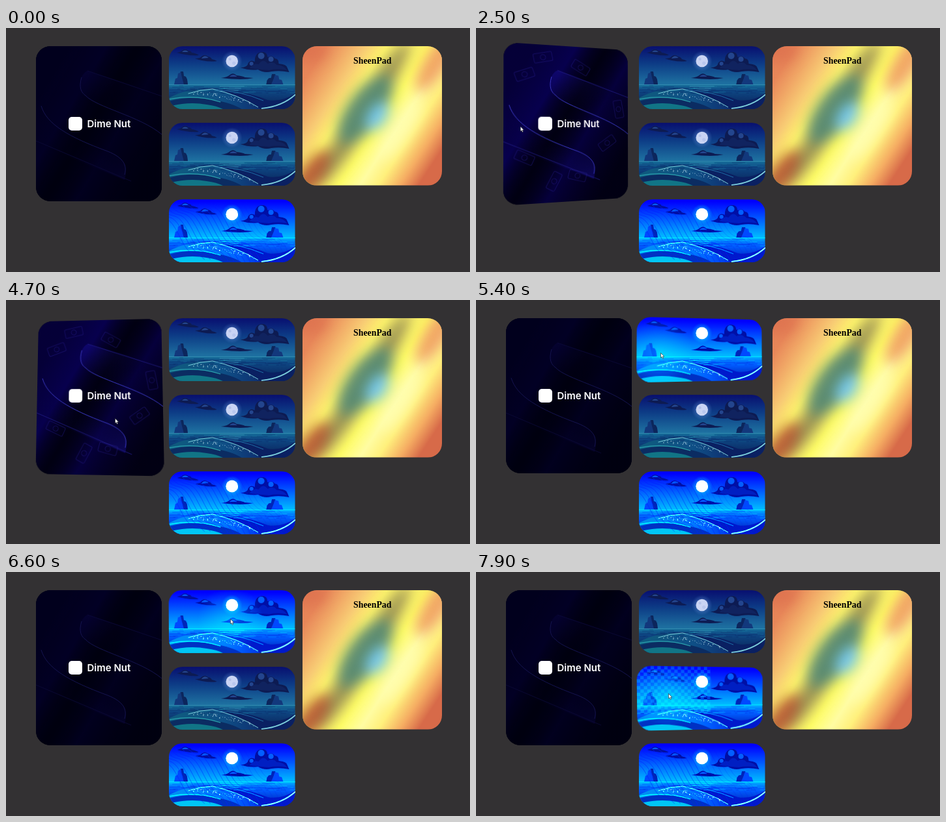
An HTML page for the animation above (8000 ms loop, 712 by 376 pixels).

```html
<!DOCTYPE html>
<html lang="en">
<head>
<meta charset="utf-8">
<title>Tilting cards</title>
<style>
html, body { margin: 0; width: 100%; height: 100%; overflow: hidden; background: #333133; }
#stage { position: relative; width: 712px; height: 376px; overflow: hidden; }
.card { position: absolute; overflow: hidden; border-radius: 21px; }
.card svg { position: absolute; inset: 0; width: 100%; height: 100%; }
.wide { left: 250px; width: 193.5px; height: 97px; }
.glow { position: absolute; inset: 0; opacity: 0; }
#pay { left: 46px; top: 28px; width: 193px; height: 239px; border-radius: 22px; background: #00000f; }
#pay text { font: 600 15px Inter, sans-serif; fill: #fff; }
#holo { left: 454.5px; top: 28px; width: 214.5px; height: 214.5px; border-radius: 22px; }
#holo text { font: bold 13.8px "Liberation Serif", serif; text-anchor: middle; }
#cursor { position: absolute; left: 0; top: 0; width: 8px; height: 11px; }
.defs { position: absolute; width: 0; height: 0; }
</style>
</head>
<body>
<div id="stage">
  <svg class="defs">
    <defs>
      <linearGradient id="sky" x2="0" y2="1">
        <stop stop-color="#080f70"/><stop offset=".45" stop-color="#0d3c86"/><stop offset="1" stop-color="#1f74a2"/>
      </linearGradient>
      <linearGradient id="water" x2="0" y2="1">
        <stop stop-color="#16709a"/><stop offset=".25" stop-color="#0e4784"/><stop offset="1" stop-color="#092056"/>
      </linearGradient>
      <linearGradient id="foam">
        <stop stop-color="#0f5c7e"/><stop offset=".6" stop-color="#0f4f86"/><stop offset="1" stop-color="#0e2f70"/>
      </linearGradient>
      <radialGradient id="halo">
        <stop offset=".4" stop-color="#7d9fe0" stop-opacity=".45"/><stop offset="1" stop-color="#5c90dc" stop-opacity="0"/>
      </radialGradient>
      <linearGradient id="ribbon" x2=".6" y2="1">
        <stop stop-color="#1a10a0"/><stop offset=".6" stop-color="#05032c" stop-opacity=".2"/>
      </linearGradient>
      <linearGradient id="ribbon2" x1="1" y1="1" x2=".4" y2="0">
        <stop stop-color="#1a10a0"/><stop offset=".6" stop-color="#05032c" stop-opacity=".2"/>
      </linearGradient>
      <linearGradient id="beam" x1=".1" y1=".2" x2=".9" y2=".8">
        <stop stop-color="#0a0060" stop-opacity=".5"/><stop offset=".25" stop-color="#0a0068" stop-opacity=".7"/>
        <stop offset=".45" stop-color="#04001c" stop-opacity=".2"/><stop offset=".65" stop-color="#0a0060" stop-opacity=".55"/>
        <stop offset="1" stop-color="#04001c" stop-opacity=".3"/>
      </linearGradient>
      <linearGradient id="foil" x1=".04" y1=".2" x2=".96" y2=".8">
        <stop stop-color="#e88759"/><stop offset=".1" stop-color="#f0a565"/><stop offset=".22" stop-color="#f8cc74"/>
        <stop offset=".33" stop-color="#fff56c"/><stop offset=".45" stop-color="#f4e668"/><stop offset=".56" stop-color="#fffd66"/>
        <stop offset=".68" stop-color="#fffca2"/><stop offset=".78" stop-color="#fff07c"/>
        <stop offset=".9" stop-color="#f5ac62"/><stop offset="1" stop-color="#d76a49"/>
      </linearGradient>
      <g id="rock">
        <path d="M0 20L2 11 5 10 6 3 9 2 10 0H14L15 7 18 8 20 12 21 20Z" fill="#12387c"/>
        <path d="M10 0H14L15 7 18 8 20 12 21 20H15L12 9Z" fill="#0c265c"/>
      </g>
      <g id="sea">
        <rect width="194" height="60" fill="url(#sky)"/>
        <circle cx="97" cy="23" r="16" fill="url(#halo)"/>
        <circle cx="97" cy="23" r="9.3" fill="#c9d4f4"/>
        <circle cx="94" cy="20" r="2" fill="#b4c2ea"/><circle cx="100" cy="26" r="2.6" fill="#b9c7ee"/>
        <g fill="#0d1b52">
          <path d="M12 10Q18 9 20 7 25 3 30 7 34 7 35 10 42 11 46 14 28 15 12 10Z"/>
          <path d="M40 19Q48 19 50 16 55 12 60 16 65 17 66 20 71 21 74 23 56 25 40 19Z"/>
          <path d="M110 33Q121 33 122 26 126 20 132 24 132 9 144 9 151 9 152 17 159 13 163 19 169 19 169 27 181 28 182 33L185 40Q171 37 158 39 146 42 137 36 124 38 110 33Z"/>
          <path d="M80 49Q90 48 94 44 99 40 104 45 113 46 117 48L130 49Q114 53 80 49Z"/>
        </g>
        <g fill="#23458e">
          <circle cx="142" cy="15" r="5"/><circle cx="157" cy="20" r="4"/><circle cx="127" cy="27" r="3"/>
          <path d="M20 9Q25 4 30 9ZM50 19Q55 12 61 18ZM93 47Q99 41 105 47Z"/>
        </g>
        <path d="M124 34Q130 25 138 28 145 18 152 27 160 22 166 29 176 29 182 37 165 34 154 37 140 36 124 34Z" fill="#10235f"/>
        <use href="#rock" x="8" y="39"/>
        <use href="#rock" transform="translate(176 43) scale(-1.25 .82)"/>
        <rect y="59" width="194" height="38" fill="url(#water)"/>
        <path d="M0 59.5H194" stroke="#3b95b6" stroke-width=".8"/>
        <path d="M78 62H116M84 65H111M88 68H107" stroke="#4fb0cc" opacity=".6"/>
        <path d="M0 80Q28 64 67 66 104 74 141 97H0Z" fill="url(#foam)"/>
        <path d="M67 66Q112 67 152 83 172 87 194 73V97H141Q104 72 67 66Z" fill="#0a2062"/>
        <path d="M0 85Q32 76 70 83 98 88 112 97H0Z" fill="#0b2c62"/>
        <path d="M0 93Q30 85 58 90 74 92 83 97H0Z" fill="#117586"/>
        <g class="streaks" fill="none"></g>
        <g fill="none" stroke="#7ccfdc" stroke-linecap="round">
          <path d="M30 73Q48 67 67 66 107 75 137 94"/>
          <path d="M72 68Q108 68 145 84" stroke="#1f6ea6"/>
          <path d="M143 96Q174 93 194 75" stroke-width="1.8"/>
          <path d="M0 82Q40 74 79 86" stroke="#2aa0ac" stroke-width="1.2"/>
        </g>
        <g class="spray" fill="#dcfaff"></g>
      </g>
      <pattern id="checker" width="10" height="10" patternUnits="userSpaceOnUse">
        <path d="M0 0H5V5H0ZM5 5H10V10H5Z" fill="#54beff"/>
      </pattern>
    </defs>
  </svg>

  <div class="card" id="pay">
    <svg viewBox="0 0 193 239">
      <rect width="193" height="239" fill="#00000f"/>
      <g id="art">
        <rect width="193" height="239" fill="url(#beam)"/>
        <path d="M193 74L79 38C66 44 64 66 76 76 92 94 160 108 193 136Z" fill="url(#ribbon)" opacity=".45"/>
        <path d="M8 92C16 120 50 140 110 162 135 172 142 184 136 206L0 150Z" fill="url(#ribbon2)" opacity=".45"/>
        <path d="M70 48C65 64 70 72 76 76 92 94 160 108 193 136M8 92C16 120 50 140 110 162 135 172 140 184 136 198" fill="none" stroke="#3a38c0" stroke-width="1"/>
        <path d="M79 38L193 77M0 146L146 208" stroke="#221e86" stroke-width=".8"/>
        <g id="notes" fill="none" stroke="#2a2298"></g>
      </g>
      <rect x="50" y="109" width="21" height="21" rx="5" fill="#fff"/>
      <text x="78.5" y="125">Dime Nut</text>
    </svg>
  </div>

  <div class="card wide" style="top:28px"><svg viewBox="0 0 194 97"><use href="#sea"/></svg><div class="glow"></div></div>
  <div class="card wide" style="top:146px"><svg viewBox="0 0 194 97"><use href="#sea"/><rect id="check" width="110" height="72" fill="url(#checker)" opacity="0"/></svg><div class="glow"></div></div>
  <div class="card wide" id="lit" style="top:264px">
    <svg viewBox="0 0 194 97"><use href="#sea"/><g id="contours" fill="none" stroke="#08257c" opacity=".5"></g></svg>
  </div>

  <div class="card" id="holo">
    <svg viewBox="0 0 214 214">
      <rect width="214" height="214" fill="url(#foil)"/>
      <g style="filter:blur(10px)">
        <ellipse cx="4" cy="4" rx="34" ry="22" fill="#d9694b" opacity=".6"/>
        <ellipse cx="92" cy="104" rx="130" ry="17" transform="rotate(-58 92 104)" fill="#85804e" opacity=".8"/>
        <ellipse cx="11" cy="200" rx="48" ry="17" transform="rotate(-55 11 200)" fill="#b04a31" opacity=".85"/>
        <ellipse cx="206" cy="22" rx="55" ry="17" transform="rotate(-58 206 22)" fill="#ef955b" opacity=".85"/>
        <ellipse cx="96" cy="97" rx="62" ry="27" transform="rotate(-54 96 97)" fill="#4f8976" opacity=".85"/>
        <ellipse cx="115" cy="108" rx="25" ry="14" transform="rotate(-56 115 108)" fill="#77c9ed"/>
        <ellipse cx="151" cy="130" rx="54" ry="14" transform="rotate(-56 151 130)" fill="#ffffb8" opacity=".7"/>
      </g>
      <text x="107" y="27">SheenPad</text>
    </svg>
  </div>

  <svg id="cursor" viewBox="0 0 8 11"><path d="M.5 .5V8L2.2 6.5 3.4 9.3 4.7 8.7 3.5 6H5.8Z" fill="#fff" stroke="#222" stroke-width=".6"/></svg>
</div>
<script>
const $ = s => document.querySelector(s);
const clamp = (v, a, b) => Math.max(a, Math.min(b, v));
const LOOP = 8000, STEP = 100, MAX_TILT = 12;

let seed = 5;
const rnd = () => (seed = seed * 16807 % 2147483647) / 2147483647;

// spray along the wave crest
let dots = '';
for (let i = 0; i < 55; i++) {
  const u = rnd(), x = 38 + u * 92, y = 70 + u * u * 18 + rnd() * 6;
  dots += `<circle cx="${x}" cy="${y}" r="${.25 + rnd() * .45}"/>`;
}
$('.spray').innerHTML = dots;

// ripples on the water
let ripples = '';
for (let i = 0; i < 60; i++) {
  const x = rnd() * 194, y = 61 + rnd() * 12, w = 6 + rnd() * 22;
  ripples += `<path d="M${x} ${y}h${w}" stroke="${i % 3 ? '#0a2866' : '#1f86a6'}" stroke-width=".7" opacity=".6"/>`;
}
$('.streaks').innerHTML = ripples;

// wavy contour lines over the last seascape
let lines = '';
for (let i = 0; i < 17; i++) {
  let d = '';
  for (let k = 0; k <= 20; k++) {
    const x = i * 9 - 35 + k * 4.5, y = k * 5 + 7 * Math.sin(k * .55 + i * .2);
    d += (k ? 'L' : 'M') + x + ' ' + y;
  }
  lines += `<path d="${d}" opacity="${i < 11 ? 1 : .4}"/>`;
}
$('#contours').innerHTML = lines;

// faint banknotes: x, y, angle
$('#notes').innerHTML = [[30, 46, -20], [57, 19, -12], [115, 32, 30], [177, 96, 80], [158, 150, -35], [74, 207, -62], [30, 170, 25], [110, 200, 15]]
  .map(([x, y, a]) => `<g transform="translate(${x} ${y}) rotate(${a})"><rect x="-14" y="-7" width="28" height="14" rx="2"/><circle r="4"/></g>`).join('');

// pointer path: time, x, y
const path = [[1700, 150, -16], [1900, 135, 42], [2250, 72, 92], [2600, 66, 175], [2950, 150, 215], [3400, 214, 149],
  [3700, 190, 85], [4000, 76, 95], [4300, 84, 195], [4700, 167, 182], [5000, 225, 115], [5150, 255, 92], [5400, 283, 81],
  [5800, 385, 62], [6200, 405, 98], [6600, 344, 72], [6900, 288, 82], [7200, 300, 136], [7500, 322, 172], [7900, 295, 187]];

function pointer(t) {
  const i = path.findIndex(p => p[0] > t);
  if (i === 0) return [-20, -20];
  if (i < 0) return path[path.length - 1].slice(1);
  const [t0, x0, y0] = path[i - 1], [t1, x1, y1] = path[i], u = (t - t0) / (t1 - t0);
  return [x0 + (x1 - x0) * u, y0 + (y1 - y0) * u];
}

// lights up a seascape: pale tones turn to neon, dark ones stay deep
const shine = h => `brightness(${1 + .45 * h}) contrast(${1 + .25 * h}) saturate(${1 + .5 * h})`;

const wides = document.querySelectorAll('.wide');
const cards = [
  { el: $('#pay'), cx: 142.5, cy: 147.5, hw: 96.5, hh: 119.5, from: 1850, to: 5050 },
  { el: wides[0], cx: 346.5, cy: 76.5, hw: 96.5, hh: 48.5, from: 5150, to: 7150 },
  { el: wides[1], cx: 346.5, cy: 194.5, hw: 96.5, hh: 48.5, from: 7250, to: 9000 }
];
$('#lit').style.filter = shine(1);

function draw() {
  const t = Math.floor(performance.now() % LOOP / STEP) * STEP;
  const [x, y] = pointer(t);
  $('#cursor').style.transform = `translate(${x}px,${y}px)`;
  cards.forEach((c, i) => {
    const h = clamp((t - c.from) / 200, 0, 1) * clamp((c.to + 250 - t) / 250, 0, 1);
    const fx = clamp((x - c.cx) / c.hw, -1, 1), fy = clamp((y - c.cy) / c.hh, -1, 1);
    c.el.style.transform = h ? `perspective(300px) rotateX(${fy * MAX_TILT * h}deg) rotateY(${-fx * MAX_TILT * h}deg)` : 'none';
    if (!i) {
      $('#art').setAttribute('opacity', .36 + .64 * h);
      $('#notes').setAttribute('opacity', .4 * h);
      return;
    }
    c.el.style.filter = shine(h);
    const glow = c.el.querySelector('.glow');
    glow.style.opacity = h;
    glow.style.background = `radial-gradient(circle at ${(fx + 1) * 50}% ${(fy + 1) * 50}%, #3ab0f044, #3ab0f000 50px)`;
    if (i === 2) $('#check').setAttribute('opacity', .18 * h);
  });
  requestAnimationFrame(draw);
}
draw();
</script>
</body>
</html>
```
